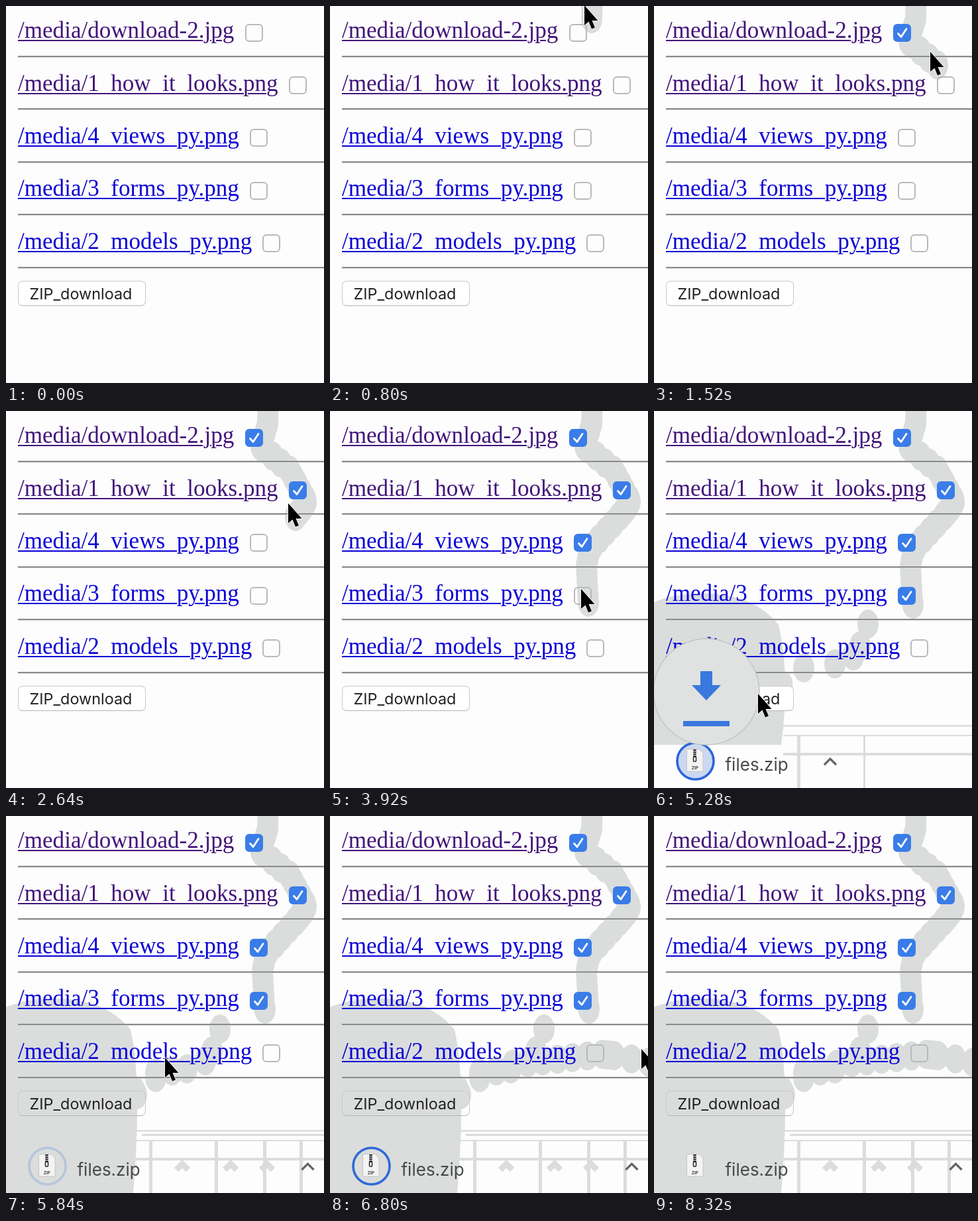
Animation, 480 px wide and 568 px high, one loop 8400 ms. Source, as an HTML page:

```html
<!DOCTYPE html>
<html lang="en">
<head>
<meta charset="utf-8">
<style>
html, body { margin: 0; width: 100%; height: 100%; overflow: hidden; background: #fdfdfd; }
body > * { position: absolute; box-sizing: border-box; }
svg { left: 0; top: 0; width: 480px; height: 568px; }
a {
  left: 18px; font: 35.1px/40px "Liberation Serif", "Times New Roman", serif; color: #0a02d6;
  white-space: nowrap; text-decoration: underline 2px; text-underline-offset: 2.5px;
}
a.seen { color: #43157a; }
hr { left: 18px; width: 462px; height: 3px; margin: 0; border: 0; background: linear-gradient(#8b8b8b 2px, #dcdcdc 2px); }
i { width: 27px; height: 27px; border: 2px solid #b9b9b9; border-radius: 6px; }
i svg { display: none; position: absolute; left: -2px; top: -2px; width: 27px; height: 27px; }
i.on { background: #3a7ce8; border-color: #3a7ce8; }
i.on svg { display: block; }
#btn {
  left: 18px; top: 413.5px; width: 192.5px; height: 38px; padding-left: 16.5px;
  border: 1.5px solid #c9c9c9; border-bottom-color: #b4b4b4; border-radius: 7px;
  font: 23.4px/38px Inter, sans-serif; color: #222; white-space: nowrap;
}
text { font-family: Inter, sans-serif; }
</style>
</head>
<body>
<svg id="back"></svg>
<div id="btn">ZIP_download</div>
<svg id="front"></svg>
<script>
const LOOP = 8400, STEP = 80, GREY = '#dadddc', BLUE = '#3a78dd';
const $ = id => document.getElementById(id);

// file name, checkbox left edge, time of the click
const rows = [
  ['download-2.jpg', 360.5, 1120],
  ['1_how_it_looks.png', 427, 2160],
  ['4_views_py.png', 367.5, 3200],
  ['3_forms_py.png', 367.5, 4000],
  ['2_models_py.png', 387, Infinity]
];
const boxes = rows.map(([name, x], i) => {
  const y = i * 79.4;
  $('btn').insertAdjacentHTML('beforebegin', `
    <a class="${i < 2 ? 'seen' : ''}" style="top:${17.2 + y}px">/media/${name}</a>
    <i style="left:${x}px;top:${26.5 + y}px"><svg viewBox="0 0 27 27"><path d="M7.5 14.5l4.5 5L20 7.5"
      fill="none" stroke="#fff" stroke-width="2.8" stroke-linecap="round" stroke-linejoin="round"/></svg></i>
    <hr style="top:${75 + y}px">`);
  return $('btn').previousElementSibling.previousElementSibling;
});

// pointer path: time, x, y
const path = [
  [400, 385, -45], [800, 384, 0], [1040, 374, 34], [1280, 378, 38], [1520, 417, 70],
  [1840, 440, 112], [2160, 442, 118], [2480, 436, 128], [2640, 426, 140], [2960, 385, 185],
  [3200, 380, 194], [3520, 376, 215], [3920, 379, 269], [4080, 380, 272], [4160, 312, 302],
  [4240, 300, 335], [4320, 290, 350], [4400, 262, 362], [4480, 215, 368], [4640, 150, 420],
  [5040, 157, 427], [5600, 157, 427], [5760, 215, 375], [5920, 265, 355], [6080, 310, 350],
  [6400, 400, 340], [6640, 418, 342], [6800, 470, 352], [6960, 500, 360]
];
function pointer(t) {
  const n = path.findIndex(p => p[0] >= t);
  if (n < 1) return n ? [500, 360] : [385, -45];
  const [a, b] = [path[n - 1], path[n]], k = (t - a[0]) / (b[0] - a[0]);
  return [a[1] + (b[1] - a[1]) * k, a[2] + (b[2] - a[2]) * k];
}

const SHELF = 5120, RISE = [43, 16, 0], EDGE = [218, 218, 317, 390, 445, 485, 505];
const at = (list, n) => list[Math.min(n, list.length - 1)];
const rule = (x, y, w, h) => `<rect x="${x}" y="${y}" width="${w}" height="${h}" fill="${GREY}"/>`;
const chevron = (x, color, w) =>
  `<path d="M${x - 9} 533l9-9 9 9" fill="none" stroke="${color}" stroke-width="${w}"/>`;

function smear(t) {
  let s = '';
  for (let u = 400; u <= t; u += STEP) {
    const [x, y] = pointer(u);
    s += `<ellipse cx="${x + 11}" cy="${y + 19}" rx="16" ry="22" fill="${GREY}"/>`;
  }
  if (t < SHELF) return s;
  const n = (t - SHELF) / STEP, end = n < 3 ? 503 : 568;
  s += `<path d="M0 288Q30 275 75 275Q150 275 188 322Q206 400 192 ${end}H0Z" fill="${GREY}"/>`;
  if (n > 0) s += rule(195, 515, 285, 4);
  if (n > 1) s += rule(195, 488, 285, 2) + rule(216, 488, 5, 80);
  if (n > 2) s += rule(205, 479, 275, 3);
  for (let k = 2; k < Math.min(n, 5); k++)
    s += rule(EDGE[k] - 2, 488, 5, 80) + chevron(EDGE[k] - 51, GREY, 9);
  return s;
}

function shelf(t) {
  const n = (t - SHELF) / STEP, edge = at(EDGE, n);
  const p = (t - 5360) / 1850;
  const glow = p < 0 ? 1 : p < 1 ? Math.cos(5 * Math.PI * p) / 2 + .5 : 0;
  return `<g transform="translate(0 ${at(RISE, n)})">
    ${rule(0, 473, 480, 2.5)}${rule(edge - 1, 488, 3, 80)}
    <circle cx="62.5" cy="527.5" r="27.5" fill="${p < 0 ? '#cbd8f1' : 'none'}" stroke="#2b66d9" stroke-width="3.6" opacity="${glow}"/>
    <path d="M49.5 509.5h19l5.5 5.5v28h-24.500z" fill="#f3f3f3" stroke="#c4c6c6"/>
    <path d="M61.500 510v13" stroke="#222" stroke-width="4.500" stroke-dasharray="2 1"/>
    <rect x="59.500" y="521" width="4" height="7" rx="1" fill="#fff" stroke="#222" stroke-width="1.500"/>
    <text x="61.800" y="540" font-size="6.500" font-weight="600" text-anchor="middle" fill="#333">ZIP</text>
    <text x="107.500" y="542" font-size="26" fill="#484a4a">files.zip</text>
    ${chevron(edge === 505 ? 455.5 : edge - 51, '#646666', 3.2)}</g>`;
}

function badge(t) {
  const p = (t - SHELF) / 400;
  if (p < 0 || p >= 1) return '';
  return `<g transform="translate(79 ${390 + 82.5 * p}) scale(${(120 - 100 * p) / 80})" opacity="${Math.min(1, (1 - p) * 3)}">
    <circle r="80" fill="#dfe2e1" stroke="#c3c6c5" stroke-width="1.500"/>
    <path d="M-9-31H9V-10H22L0 13-22-10H-9ZM-35 44H35V52H-35Z" fill="${BLUE}"/></g>`;
}

function draw(t) {
  boxes.forEach((b, i) => b.classList.toggle('on', t >= rows[i][2]));
  $('btn').style.background = t < 5360 ? '#fff' : 'none';
  $('back').innerHTML = smear(t);
  const [x, y] = pointer(t);
  $('front').innerHTML = (t < SHELF ? '' : shelf(t)) + badge(t) +
    `<path transform="translate(${x} ${y})" d="M0-1V29L6.500 23.500 11 34.500 16 32.500 11.500 22H20.500Z"
      fill="#000" stroke="#fff" stroke-width="1.500" paint-order="stroke"/>`;
}

let last = -1;
function tick() {
  const t = Math.floor(performance.now() % LOOP / STEP) * STEP;
  if (t !== last) draw(last = t);
  requestAnimationFrame(tick);
}
tick();
</script>
</body>
</html>
```
